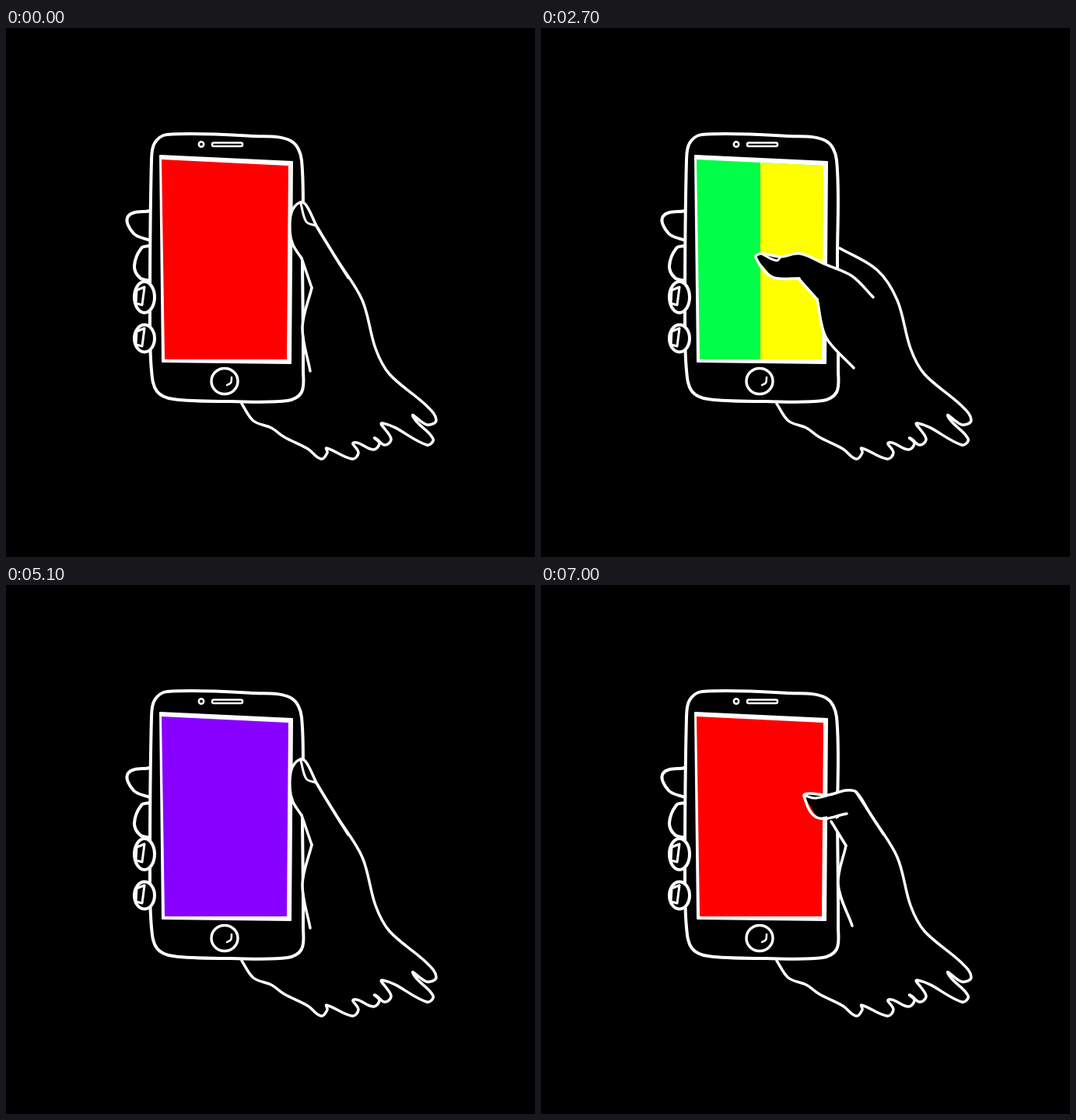
These frames come from a looping animation (680x680 px, 7100 ms). An HTML page with a canvas:

```html
<!DOCTYPE html>
<html>
<head>
<meta charset="utf-8">
<style>
html, body { margin: 0; height: 100%; overflow: hidden; background: #000; }
canvas { display: block; }
</style>
</head>
<body>
<canvas id="stage" width="680" height="680"></canvas>
<script>
const ctx = document.getElementById('stage').getContext('2d');
const LOOP = 7100, STEP = 100;
const colours = ['#f00', '#f80', '#ff0', '#00ff48', '#008aff', '#80f'];
const stripes = [0, 2, 1, 3, 4, 5].map(i => colours[i]);
const screens = [...colours, 'rainbow'];
const swipes = [800, 1700, 2700, 3600, 4600, 5600, 6800];

const points = text => text.split(' ').map(p => p.split(',').map(Number));
const pose = (thumb, nail, crease, palm, knuckle) =>
  [thumb, nail, crease, palm, knuckle].map(points);
const mix = (a, b) => Array.isArray(a) ? a.map((v, i) => mix(v, b[i])) : (a + b) / 2;

const rest = pose(
  '440,321 420,289 400,256 386,228 378,224 367,237 365,262 369,279 380,296',
  '379,226 386,249 398,254', '380,296', '393,334 381,385 391,441', '400,256 425,297');
const reach = pose(
  '427,346 400,319 366,304 333,290 308,294 283,290 276,295 297,320 332,322',
  '285,291 303,299 308,294', '331,322', '355,349 366,397 402,437', '384,283 432,311');
const release = pose(
  '440,320 422,292 405,266 392,264 368,270 345,268 338,271 355,299 393,294',
  '340,271 352,274 367,271', '373,304', '392,335 382,385 400,438', '405,266 425,297');
const swipePoses = [reach, mix(reach, release), release];

// Ragged cuff: each drip hangs from a notch up and to the left of its tip
const drips = [[546, 535, 23, 36], [492, 535, 8, 27], [477, 541, 3, 14], [450, 553, 3, 20], [410, 553, -2, 13]];
const wrist = [
  ...points('458,350 475,412 493,445 540,485 553,504 541,510'),
  ...drips.flatMap(([x, y, w, h]) => [[x - w, y - h], [x + 3, y - 7], [x - 5, y + 1]]),
  ...points('388,541 358,526 341,514 318,505 303,483')
];
const body = points('207,137 320,139 366,145 380,170 381,300 382,440 380,468 362,479 ' +
  '290,480 215,477 194,467 187,440 185,370 187,170 191,148');
const fingers = ['185,235 157,242 164,264 185,273', '185,280 174,283 165,306 172,321 185,325'].map(points);
const bezel = new Path2D('M198 164L368 172L366 431L201 429Z');
const glass = new Path2D('M200 169L363 177L361 426L204 426Z');

// Smooth curve through the points; handles are a third of each segment
function line(pts, width = 3.5, closed = false) {
  const n = pts.length;
  const at = i => closed ? pts[(i + n) % n] : pts[Math.max(0, Math.min(n - 1, i))];
  const angle = i => Math.atan2(at(i + 1)[1] - at(i - 1)[1], at(i + 1)[0] - at(i - 1)[0]);
  ctx.beginPath();
  ctx.moveTo(...pts[0]);
  for (let i = 0; i < (closed ? n : n - 1); i++) {
    const [x, y] = at(i), [u, v] = at(i + 1);
    const r = Math.hypot(u - x, v - y) / 3, a = angle(i), b = angle(i + 1);
    ctx.bezierCurveTo(x + r * Math.cos(a), y + r * Math.sin(a),
      u - r * Math.cos(b), v - r * Math.sin(b), u, v);
  }
  ctx.lineWidth = width;
  ctx.stroke();
}

function oval(x, y, rx, ry, width) {
  ctx.beginPath();
  ctx.ellipse(x, y, rx, ry, 0, 0, 7);
  ctx.lineWidth = width;
  ctx.fill();
  ctx.stroke();
}

function drawPhone() {
  line(body, 4, true);
  oval(251, 149.5, 3.2, 3.2, 2.5);
  oval(281, 454, 17, 16.5, 3.5);
  line(points('290,449 289,456 284,459'), 2.5);
  ctx.beginPath();
  ctx.roundRect(265, 147.5, 39, 4.5, 2);
  ctx.stroke();
  fingers.forEach(f => line(f, 4));
  for (const y of [346, 399]) {
    oval(178, y, 13, y < 350 ? 20 : 17.5, 4);
    ctx.lineWidth = 3;
    ctx.stroke(new Path2D(`M168 ${y - 9}L178 ${y - 13}L175 ${y + 10}L167 ${y + 8}Z`));
  }
}

function paint(screen, left) {
  const bands = screen === 'rainbow' ? stripes : [screen];
  bands.forEach((colour, i) => {
    const top = i ? 161.5 + 45.7 * i : 160;
    ctx.fillStyle = colour;
    ctx.fillRect(left, Math.round(top), 200, 300);
  });
}

function drawScreen(current, previous, split) {
  ctx.fillStyle = '#fff';
  ctx.fill(bezel);
  ctx.lineWidth = 2;
  ctx.stroke(bezel);
  ctx.save();
  ctx.clip(glass);
  paint(current, 190);
  if (split) paint(previous, split);
  ctx.restore();
}

function drawHand([thumb, nail, crease, palm, knuckle]) {
  ctx.fillStyle = '#000';
  ctx.beginPath();
  [...thumb, ...crease, ...palm, [440, 400]].forEach(p => ctx.lineTo(...p));
  ctx.fill();
  [thumb, [...crease, palm[0]], palm, [...knuckle, ...wrist]].forEach(pts => line(pts));
  line(nail, 3);
}

function draw(now) {
  const t = Math.floor(now % LOOP / STEP) * STEP;
  const count = swipes.filter(s => s <= t).length;
  const step = count ? (t - swipes[count - 1]) / STEP : Infinity;
  ctx.fillStyle = '#000';
  ctx.fillRect(0, 0, 680, 680);
  ctx.strokeStyle = '#fff';
  ctx.lineCap = ctx.lineJoin = 'round';
  drawPhone();
  drawScreen(screens[count % 7], screens[(count + 6) % 7], step < 2 && 282 + 30 * step);
  drawHand(swipePoses[step] || rest);
}

const start = performance.now();
function tick() {
  draw(performance.now() - start);
  requestAnimationFrame(tick);
}
tick();
</script>
</body>
</html>
```
